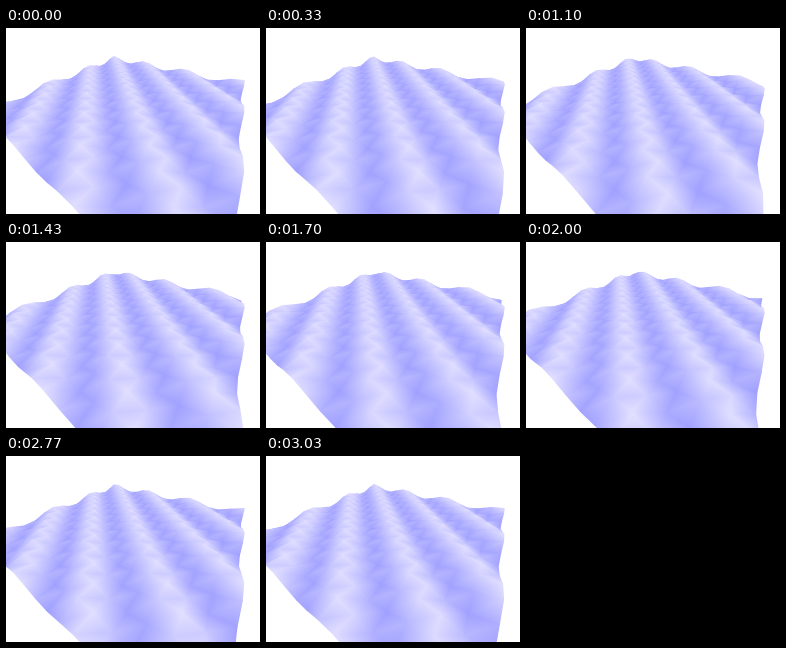
A matplotlib script for the animation above (3.06 s loop, 254 by 186 pixels).

```python
import numpy as np
import matplotlib.pyplot as plt
from matplotlib.animation import ArtistAnimation
from matplotlib.colors import LinearSegmentedColormap
from matplotlib.tri import Triangulation

WIDTH, HEIGHT, DPI = 254, 186, 100
FRAMES, INTERVAL = 102, 30
SEGMENTS = 16
WAVES = 3.05        # wave count along one side of the sheet
AMPLITUDE = 0.018
TINT_LAG = 0.03     # tint sits on the right-hand slope of each crest

# Homogeneous pixel coordinates: far corner, two sheet sides, upward axis
CORNER = np.array([108, 30.7, 1])
SIDE_U = np.array([42.56, 4.8, -0.3634])
SIDE_V = np.array([-120.4, 10.8, -0.5043])
UP = np.array([-55.7, -146.7, -0.506])

TINT = LinearSegmentedColormap.from_list("tint", ["#9f9fff", "#c0bfff", "#e4e2ff"])


def grid_faces(n):
    """Two triangles per cell, split across the wave ridges, far cells first."""
    faces = []
    cells = sorted(((i, j) for i in range(n) for j in range(n)), key=sum)
    for i, j in cells:
        a = i * (n + 1) + j
        b, c, d = a + 1, a + n + 2, a + n + 1
        faces += [(a, b, d), (b, c, d)]
    return np.array(faces)


def project(u, v, h):
    p = (CORNER[:, None] + SIDE_U[:, None] * u
         + SIDE_V[:, None] * v + UP[:, None] * h)
    return p[0] / p[2], p[1] / p[2]


def wave(across, t):
    return np.cos(2 * np.pi * (WAVES * across + t))


steps = np.linspace(0, 1, SEGMENTS + 1)
U, V = (g.ravel() for g in np.meshgrid(steps, steps, indexing="ij"))
FACES = grid_faces(SEGMENTS)

fig = plt.figure(figsize=(WIDTH / DPI, HEIGHT / DPI), dpi=DPI, facecolor="white")
ax = fig.add_axes([0, 0, 1, 1])
ax.axis("off")


def sheet(t):
    x, y = project(U, V, AMPLITUDE * wave(U - V, t))
    return ax.tripcolor(Triangulation(x, y, FACES), wave(U - V - TINT_LAG, t),
                        shading="gouraud", cmap=TINT, vmin=-1, vmax=1)


sheets = [[sheet(k / FRAMES)] for k in range(FRAMES)]
ax.set_xlim(0, WIDTH)
ax.set_ylim(HEIGHT, 0)

anim = ArtistAnimation(fig, sheets, interval=INTERVAL, repeat=True,
                       repeat_delay=0, blit=False)
plt.show()
```
